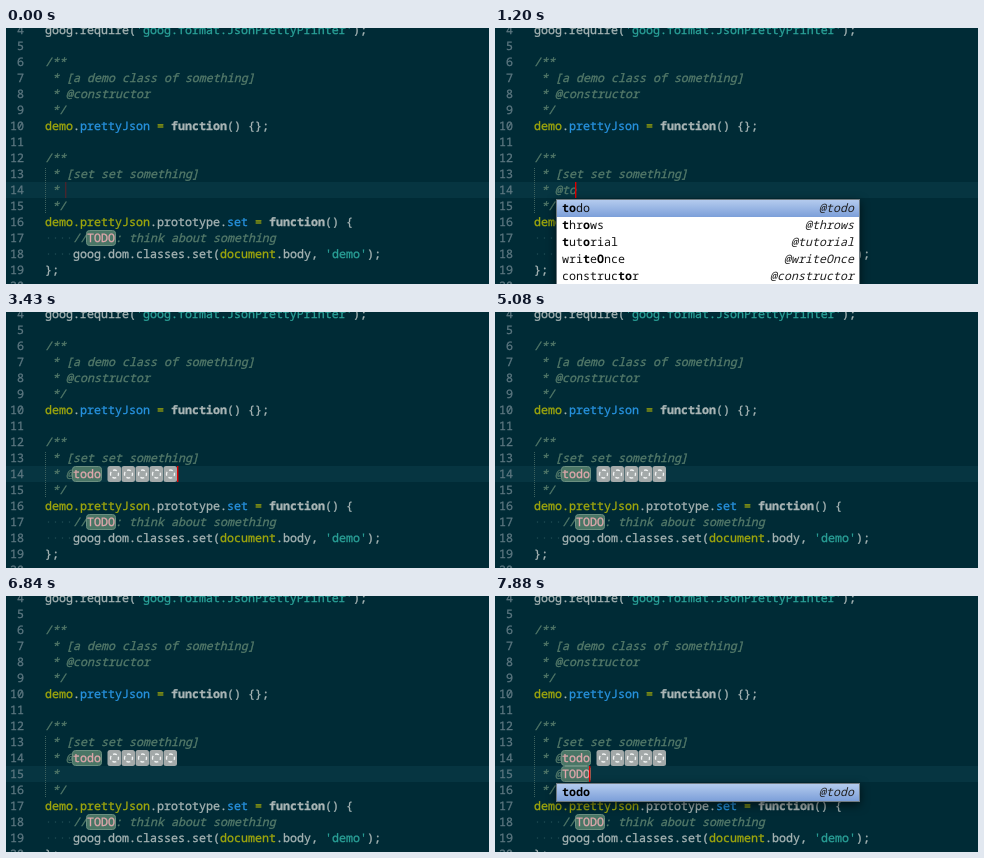
These frames come from a looping animation (483 by 256 pixels, 8 s). An HTML page:

```html
<!DOCTYPE html>
<html lang="en">
<head>
<meta charset="utf-8">
<title>Doc comment completion</title>
<style>
  html, body { margin: 0; width: 100%; height: 100%; overflow: hidden; background: #002b36; }
  svg { display: block; width: 483px; height: 256px; background: #002b36; }
  text {
    font-family: "Noto Sans Mono", "DejaVu Sans Mono", monospace;
    font-size: 11.667px;
    white-space: pre;
    text-rendering: geometricPrecision;
    color: #a6b4b4;
    fill: currentColor;
    stroke: currentColor;
    stroke-width: .3px;
  }
  .num { color: #5c7780; text-anchor: end; }
  .com { color: #547a6a; font-style: italic; }
  .cls { color: #a0a80c; }
  .fn { color: #2793e0; }
  .str { color: #2aa198; }
  .key { color: #a9b5b5; font-weight: 700; }
  .dot { color: #1d4a53; stroke: none; }
  .tag { color: #e0a8ac; }
  .field { color: #3f7478; font-style: italic; }
  .item { color: #111; stroke: none; }
  .item tspan { font-weight: 700; fill: #000; }
  .hint { color: #222; font-style: italic; text-anchor: end; stroke: none; }
  .popup { filter: drop-shadow(0 3px 5px rgba(0, 0, 0, .6)); }
</style>
</head>
<body>
<svg id="stage" viewBox="0 0 483 256">
  <defs>
    <linearGradient id="pick" x2="0" y2="1">
      <stop stop-color="#b4cbee"/>
      <stop offset="1" stop-color="#7c9fd9"/>
    </linearGradient>
  </defs>
  <g id="view"></g>
</svg>
<script>
const LOOP = 8000, CHAR = 7, ROW = 16, LEFT = 39, ITEM = 17;
const view = document.getElementById('view');

const colX = col => LEFT + col * CHAR;
const rowY = row => row * ROW - 70;

const rect = (x, y, w, h, fill, extra = '') =>
  `<rect x="${x}" y="${y}" width="${w}" height="${h}" fill="${fill}" ${extra}/>`;
const label = (x, y, style, text) => `<text x="${x}" y="${y}" class="${style}">${text}</text>`;
const put = (row, col, style, text) => label(colX(col), rowY(row) + 12, style, text);

const badge = (row, col, text) =>
  rect(colX(col) - .5, rowY(row) + .5, text.length * CHAR + 1, 15, '#4a7666', 'rx="3" stroke="#6b8f80"') +
  put(row, col, 'tag', text);

// A line is a list of [style, text] parts laid end to end.
function line(row, parts) {
  let col = 0;
  return parts.map(([style, text]) => {
    const out = style === 'badge' ? badge(row, col, text) : put(row, col, style, text);
    col += text.length;
    return out;
  }).join('');
}

const note = text => [['com', text]];
const FUNCTION = [['', ' '], ['cls', '='], ['', ' '], ['key', 'function']];
const HEAD = [
  [['', 'goog.require('], ['str', "'goog.format.JsonPrettyPrinter'"], ['', ');']],
  [],
  note('/**'),
  note(' * [a demo class of something]'),
  note(' * @constructor'),
  note(' */'),
  [['cls', 'demo'], ['', '.'], ['fn', 'prettyJson'], ...FUNCTION, ['', '() {};']],
  [],
  note('/**'),
  note(' * [set set something]')
];
const TAIL = [
  note(' */'),
  [['cls', 'demo.prettyJson'], ['', '.prototype.'], ['fn', 'set'], ...FUNCTION, ['', '() {']],
  [['dot', '····'], ['com', '//'], ['badge', 'TODO'], ['com', ': think about something']],
  [['dot', '····'], ['', 'goog.dom.classes.set('], ['cls', 'document'], ['', '.body, '],
   ['str', "'demo'"], ['', ');']],
  [['', '};']]
];
const WORDS = ['access', 'alias', 'borrows', 'callback', 'class', 'todo', 'throws',
  'tutorial', 'type', 'writeOnce', 'constructor'];

// Time, what is being edited, its value, caret opacity.
const STATES = [
  [0, 'first', '', .3], [150, 'first', '', 1], [450, 'first', '', .5], [600, 'first', '', 0],
  [750, 'first', '@', 1], [1050, 'first', '@t', 1], [1200, 'first', '@to', 1], [1350, 'first', '@tod', 1],
  [1650, 'field', 0, 1], [1950, 'field', 0, .5], [2100, 'field', 0, 0],
  [2550, 'field', 0, .5], [2690, 'field', 0, 1],
  [2990, 'faces', 1, 1], [3140, 'faces', 3, 1], [3430, 'faces', 5, 1],
  [3880, 'faces', 5, .5], [4030, 'faces', 5, 0], [4480, 'faces', 5, .5], [4630, 'faces', 5, 1],
  [4930, 'faces', 5, .5], [5080, 'faces', 5, 0],
  [5220, 'second', '', 1], [5670, 'second', '', .5], [5810, 'second', '', 0],
  [6260, 'second', '', .5], [6400, 'second', '', 1], [6700, 'second', '', .5], [6840, 'second', '', 0],
  [7290, 'second', '@', 1], [7580, 'second', '@T', 1], [7730, 'second', '@TO', 1], [7880, 'second', '@TODO', 1]
];

// Indices of the letters that match the query, or null.
// Words with another initial prefer an unbroken run.
function matchLetters(word, query) {
  const lower = word.toLowerCase(), run = lower.indexOf(query);
  let from = lower[0] !== query[0] && run > 0 ? run : 0;
  const hits = [];
  for (const letter of query) {
    const at = lower.indexOf(letter, from);
    if (at < 0) return null;
    hits.push(at);
    from = at + 1;
  }
  return hits;
}

function popup(row, query) {
  const found = WORDS.map(word => ({ word, hits: matchLetters(word, query) }))
    .filter(entry => entry.hits).slice(0, 5);
  const top = rowY(row + 1) + 1;
  const items = found.map(({ word, hits }, i) => {
    const base = top + 13 + i * ITEM;
    const marked = [...word].map((c, k) => hits.includes(k) ? `<tspan>${c}</tspan>` : c).join('');
    return label(67, base, 'item', marked) + label(359, base, 'hint', '@' + word);
  }).join('');
  return '<g class="popup">' +
    rect(61, top, 304, found.length * ITEM + 2, '#6f7a80') +
    rect(62, top + 1, 302, found.length * ITEM, '#fff') + '</g>' +
    rect(62, top + 1, 302, ITEM, 'url(#pick)') + items;
}

function face(i) {
  const x = colX(9 + 2 * i), y = rowY(14);
  return rect(x - .5, y, 13.5, ROW, '#a3a9a9', 'rx="2.5"') +
    `<circle cx="${x + 6.5}" cy="${y + 8}" r="4" fill="none" stroke="#f2f4f4" stroke-width="1.3" stroke-dasharray="4 2.28" stroke-dashoffset="2"/>`;
}

const typed = (row, text) => line(row, text === '@TODO'
  ? [['com', ' * @'], ['badge', 'TODO']]
  : note(' * ' + text));

function draw([, mode, value, caretOpacity]) {
  const second = mode === 'second', selected = mode === 'field';
  const typing = second || mode === 'first';
  const row = second ? 15 : 14;
  const caretCol = typing ? 3 + value.length : selected ? 22 : 9 + 2 * value;

  // A selection leaves only the gutter lit.
  let out = rect(0, rowY(row), selected ? 34 : 483, ROW, '#063541');
  if (!selected) {
    out += `<path d="M39.5 140V${rowY(row + 2)}" stroke="#3d625f" stroke-dasharray="1 1"/>`;
  }
  for (let n = 4; n <= 20; n++) out += label(18, rowY(n) + 12, 'num', n);
  HEAD.forEach((parts, i) => out += line(4 + i, parts));
  TAIL.forEach((parts, i) => out += line(row + 1 + i, parts));

  if (mode === 'first') out += typed(14, value);
  else {
    out += line(14, [['com', ' * @'], ['badge', 'todo']]);
    if (selected) {
      out += rect(colX(9) - 1, rowY(14), 13 * CHAR + 1, ROW, '#1b8fb0', 'rx="3"') +
        put(14, 9, 'field', '[description]');
    } else {
      const count = second ? 5 : value;
      for (let i = 0; i < count; i++) out += face(i);
    }
    if (second) out += typed(15, value);
  }

  out += rect(colX(caretCol) - 1, rowY(row), 1.4, ROW, '#e00000', `opacity="${caretOpacity}"`);
  if (typing && value) out += popup(row, value.slice(1).toLowerCase());
  view.innerHTML = out;
}

let shown;
function tick() {
  const time = performance.now() % LOOP;
  const state = STATES.findLast(([at]) => at <= time);
  if (state !== shown) draw(shown = state);
  requestAnimationFrame(tick);
}
tick();
</script>
</body>
</html>
```
